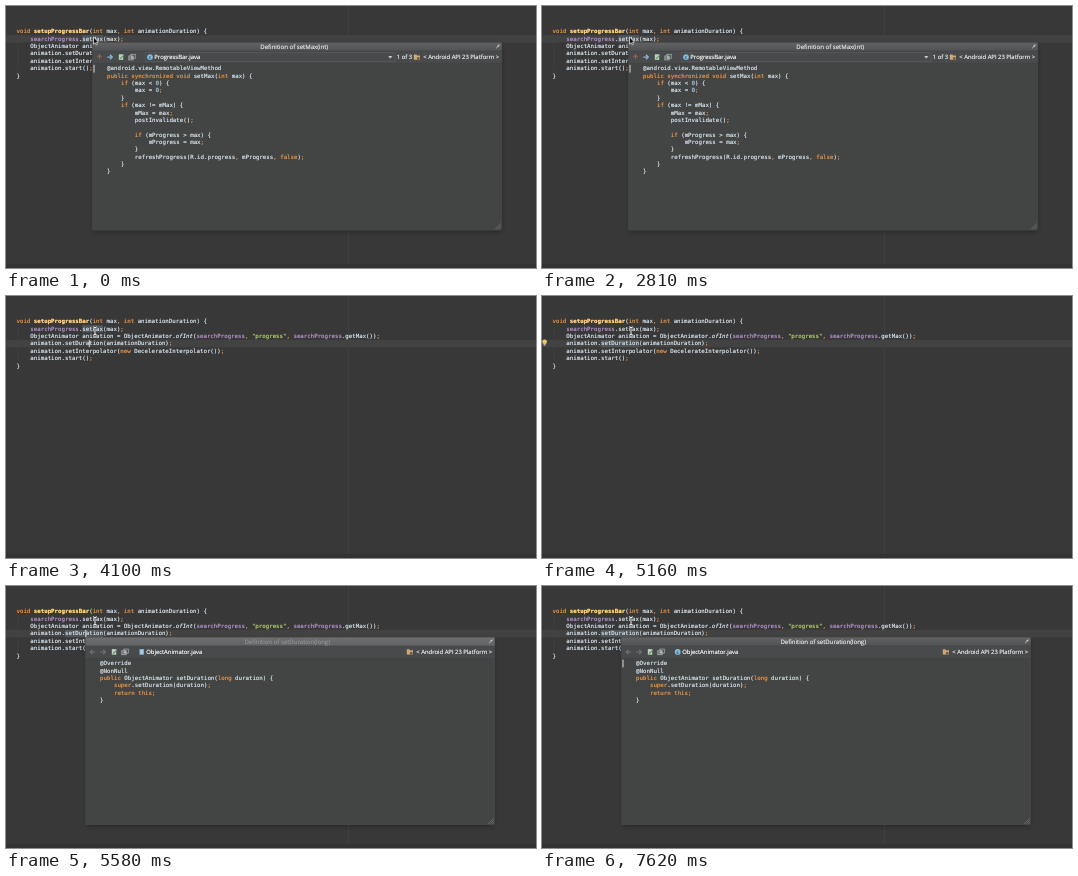
Animation of 530 by 262 pixels, one loop 8 s. Source, as an HTML page with a canvas:

```html
<!DOCTYPE html>
<html lang="en">
<head>
<meta charset="utf-8">
<title>Quick definition</title>
<style>
html, body { margin: 0; width: 100%; height: 100%; overflow: hidden; background: #383838; }
canvas { display: block; width: 530px; height: 262px; }
</style>
</head>
<body>
<canvas id="stage"></canvas>
<script>
const W = 530, H = 262, LOOP = 8000;
const ROW = 7.35, CHAR = 3.4616, TOP = 21.8, LEFT = 10.5;
const MONO = '5.75px "DejaVu Sans Mono", monospace';
const UI = '"Open Sans", sans-serif';
const INK = '#c8d3dc', ORANGE = '#dc8c40';

const canvas = document.getElementById('stage');
const ratio = window.devicePixelRatio || 1;
canvas.width = W * ratio;
canvas.height = H * ratio;
const c = canvas.getContext('2d');
c.scale(ratio, ratio);
c.textRendering = 'geometricPrecision';

const editorCode = `void setupProgressBar(int max, int animationDuration) {
    searchProgress.setMax(max);
    ObjectAnimator animation = ObjectAnimator.ofInt(searchProgress, "progress", searchProgress.getMax());
    animation.setDuration(animationDuration);
    animation.setInterpolator(new DecelerateInterpolator());
    animation.start();
}`;

const maxPopup = {
  x: 86.5, y: 36.6, title: 'Definition of setMax(int)', file: 'ProgressBar.java',
  iconX: 57.5, fileX: 61.8, count: '1 of 3',
  code: `@android.view.RemotableViewMethod
public synchronized void setMax(int max) {
    if (max < 0) {
        max = 0;
    }
    if (max != mMax) {
        mMax = max;
        postInvalidate();

        if (mProgress > max) {
            mProgress = max;
        }
        refreshProgress(R.id.progress, mProgress, false);
    }
}`
};

const durationPopup = {
  x: 79.5, y: 51.4, title: 'Definition of setDuration(long)', file: 'ObjectAnimator.java',
  iconX: 56.2, fileX: 60.7,
  code: `@Override
@NonNull
public ObjectAnimator setDuration(long duration) {
    super.setDuration(duration);
    return this;
}`
};

const TOKENS = /"[^"]*"|[A-Za-z_]\w*|\d+|[,;]|[^\s\w",;]+/g;
const KEYWORDS = new Set('void int long new public synchronized if false super return this'.split(' '));

function styleOf(token) {
  if (KEYWORDS.has(token) || /^[,;]$/.test(token)) return [ORANGE, ''];
  if (token[0] === '"') return ['#a9c466', ''];
  if (/^\d/.test(token)) return ['#9cbdd4', ''];
  if (token === 'searchProgress') return ['#ab8cc0', ''];
  if (token === 'setupProgressBar') return ['#ffcb78', 'bold '];
  if (token === 'ofInt') return [INK, 'italic '];
  return [INK, ''];
}

// A second pass gives small type a fuller weight.
function write(text, x, y) {
  c.fillText(text, x, y);
  c.fillText(text, x, y);
}

function drawCode(code, x, top) {
  code.split('\n').forEach((line, i) => {
    for (const m of line.matchAll(TOKENS)) {
      const [color, weight] = styleOf(m[0]);
      c.fillStyle = color;
      c.font = weight + MONO;
      write(m[0], x + m.index * CHAR, top + i * ROW + 5.6);
    }
  });
}

function box(x, y, w, h, color) {
  c.fillStyle = color;
  c.fillRect(x, y, w, h);
}

function disc(x, y, r, color) {
  c.fillStyle = color;
  c.beginPath();
  c.arc(x, y, r, 0, 7);
  c.fill();
}

function lines(color, width, ...paths) {
  c.strokeStyle = color;
  c.lineWidth = width;
  c.beginPath();
  for (const p of paths) {
    c.moveTo(p[0], p[1]);
    for (let i = 2; i < p.length; i += 2) c.lineTo(p[i], p[i + 1]);
  }
  c.stroke();
}

function label(text, x, y, color = '#dcdfe0', size = 5.9, align = 'left') {
  c.font = `${size}px ${UI}`;
  c.textAlign = align;
  c.fillStyle = color;
  write(text, x, y);
  c.textAlign = 'left';
}

const rowTop = row => TOP + row * ROW;
const colX = col => LEFT + col * CHAR;

function highlight(row, col, length) {
  box(colX(col), rowTop(row), length * CHAR, ROW, '#4f5558');
}

function arrow(x, y, dir, color) {
  lines(color, 1.3, [x - 2.5, y, x + 2.5, y],
    [x + dir * .2, y - 2.3, x + dir * 2.5, y, x + dir * .2, y + 2.3]);
}

function drawTools(p, y, active) {
  const x = p.x;
  if (p.count) {
    lines('#8a6350', 1.2, [x + 7, y + 2.5, x + 7, y - 2], [x + 4.8, y, x + 7, y - 2.2, x + 9.2, y]);
    arrow(x + 17.3, y, 1, '#8db4d2');
  } else {
    arrow(x + 7.2, y, -1, '#6c6f70');
    arrow(x + 17.5, y, 1, '#6c6f70');
  }
  box(x + 26.3, y - 2.8, 4.4, 5.6, '#c3cdc8');
  lines('#55a35b', 1.3, [x + 27.5, y + 1.8, x + 31.5, y - 2]);
  c.strokeStyle = '#a3a9ab';
  c.lineWidth = .8;
  c.strokeRect(x + 38.4, y - 2.8, 4.4, 4);
  box(x + 36.3, y - 1.2, 4.4, 4, '#6d7274');
  c.strokeRect(x + 36.3, y - 1.2, 4.4, 4);
  disc(x + 39.5, y + .4, 1.2, '#b5bec2');

  const ix = x + p.iconX;
  if (active) {
    disc(ix, y, 2.9, '#86bbdb');
    label('c', ix, y + 1.6, '#365a70', 4.8, 'center');
  } else {
    box(ix - 2.2, y - 2.8, 4.4, 5.6, '#8fbbd7');
    lines('#e0eaf0', .7, [ix - 1.2, y - 1, ix + 1.2, y - 1], [ix - 1.2, y + 1, ix + 1.2, y + 1]);
  }
  label(p.file, x + p.fileX, y + 2.1, '#e8eaea');

  if (p.count) {
    c.strokeStyle = '#5c5f60';
    c.lineWidth = .6;
    c.strokeRect(x + 53, y - 4.6, 249.5, 9.2);
    c.fillStyle = '#c4c8c9';
    c.beginPath();
    c.moveTo(x + 295.8, y - 1);
    c.lineTo(x + 299.8, y - 1);
    c.lineTo(x + 297.8, y + 1.6);
    c.fill();
    label(p.count, x + 304.3, y + 2.1);
  }
  const fx = x + 321.3;
  box(fx, y - 2.6, 3, 1.6, '#cbaa78');
  box(fx, y - 1.6, 6.2, 4.2, '#cbaa78');
  box(fx + 3.2, y + .2, 2.6, 2.4, '#6d5843');
  label('< Android API 23 Platform >', x + 330.8, y + 2.1);
}

function drawPopup(p, state, caret) {
  const { x, y } = p, w = 409.2, h = 187.6;
  c.save();
  c.shadowColor = 'rgba(0,0,0,.28)';
  c.shadowBlur = 5 * ratio;
  c.shadowOffsetY = 1.5 * ratio;
  box(x, y, w, h, '#4b4f51');
  c.restore();
  if (state === 'blank') return;

  const active = state === 'active';
  box(x, y + 8.6, w, 12.2, '#484a4b');
  box(x, y + 20.8, w, h - 20.8, '#434545');
  const bar = c.createLinearGradient(0, y, 0, y + 8.6);
  bar.addColorStop(0, active ? '#606263' : '#6d6e6f');
  bar.addColorStop(1, active ? '#4f5152' : '#626364');
  box(x, y, w, 8.6, bar);
  lines('#3d3f40', .5, [x, y + 8.6, x + w, y + 8.6], [x, y + 20.8, x + w, y + 20.8]);
  label(p.title, x + 201.7, y + 6.4, active ? '#d6d9da' : '#8b8d8e', 6.05, 'center');
  lines('#b2b6b7', 1, [x + w - 5.8, y + 5.8, x + w - 2, y + 2.3]);
  lines('#b2b6b7', 1.6, [x + w - 4.2, y + 4, x + w - 2.5, y + 2.6]);

  drawTools(p, y + 14.5, active);
  drawCode(p.code, x + 14.6, y + 22.2);
  if (caret) box(x + 1, y + 22.2, 1, 7.8, '#d8dadb');

  const gx = x + w - .8, gy = y + h - .8;
  lines('#7b7e7f', .6, ...[2, 4, 6].map(d => [gx - d, gy, gx, gy - d]));
}

function drawPointer(arrowShape) {
  if (arrowShape) {
    c.fillStyle = '#151515';
    c.strokeStyle = '#e8e8e8';
    c.lineWidth = .7;
    c.beginPath();
    [[87.5, 31], [87.5, 38.2], [89.2, 36.7], [90.4, 39], [91.5, 38.4], [90.4, 36.3], [92.4, 36.1]]
      .forEach(([px, py]) => c.lineTo(px, py));
    c.closePath();
    c.fill();
    c.stroke();
  } else {
    const beam = [[87, 30.6, 89, 31.8, 91, 30.6], [89, 31.8, 89, 38.2], [87, 39.4, 89, 38.2, 91, 39.4]];
    lines('#2a2a2a', 2, ...beam);
    lines('#ececec', 1.1, ...beam);
  }
}

// Each listed time flips the caret, which starts visible.
const blink = (t, flips) => flips.filter(f => t >= f).length % 2 === 0;

function editorCaret(t) {
  if (t >= 3230 && t < 5110) return true;
  return t >= 5580 && t < 5670;
}

function draw(t) {
  const row = t < 3500 ? 1 : t < 3860 ? 2 : 3;
  const col = t < 4100 ? 22 : t < 4340 ? 21 : 20;

  box(0, 0, W, H, '#383838');
  box(0, rowTop(row), W, ROW, '#424242');
  lines('#434343', .8, [342.5, 0, 342.5, 258]);
  lines('#464646', .6, [11.8, rowTop(1), 11.8, rowTop(6)]);
  box(0, 258, W, 4, '#333333');
  if (t < 4570) highlight(1, 19, 6);
  else highlight(3, 14, 11);
  drawCode(editorCode, LEFT, TOP);
  if (editorCaret(t)) box(colX(col) - .4, rowTop(row), 1, ROW, '#dcdcdc');

  if (t >= 5160 && t < 5580) {
    disc(2.6, 45.8, 2.4, '#f2c766');
    box(1.5, 47.9, 2.2, 1.8, '#b3aa98');
  }
  if (t < 3170) drawPopup(maxPopup, 'active', blink(t, [300, 840, 1320, 1860, 2340, 2810]));
  if (t >= 5520) {
    const state = t < 5580 ? 'blank' : t < 5670 ? 'inactive' : 'active';
    drawPopup(durationPopup, state, t >= 5670 && blink(t, [6120, 6660, 7140, 7620]));
  }
  drawPointer(t < 3170);
}

const start = performance.now();
function tick() {
  draw((performance.now() - start) % LOOP);
  requestAnimationFrame(tick);
}
tick();
</script>
</body>
</html>
```
